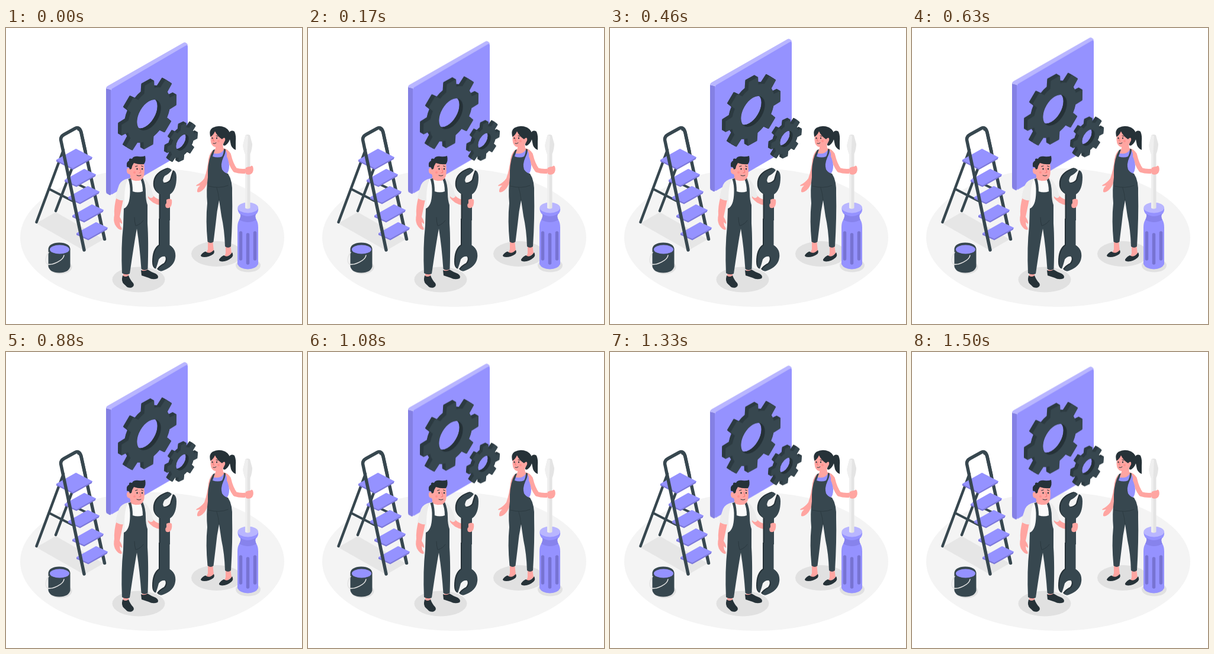
Recreate the animation shown at these times as an HTML page. Size 500 px wide and 500 px high, loop 1540 ms.

```html
<!DOCTYPE html>
<html lang="en">
<head>
<meta charset="utf-8">
<title>Maintenance crew</title>
<style>
  html, body { margin: 0; width: 100%; height: 100%; overflow: hidden; background: #fff; }
  svg { display: block; width: 100%; height: 100%; }
  .float { animation: float 770ms linear -55ms infinite alternate; }
  @keyframes float {
    from { transform: translateY(.7px); }
    to { transform: translateY(-9.3px); }
  }
  .floor { fill: #f4f4f4; }
  .shade { fill: #e1e1e1; }
  .dark { fill: #37474f; }
  .ink { fill: #263238; }
  .skin { fill: #ffa5a1; }
  .white { fill: #ececec; }
  .main { fill: #9592ff; }
  .light { fill: #b9b6ff; }
  .steel { fill: #e4e4e4; }
  .shine { fill: #efefef; }
  .line { fill: none; stroke-linecap: round; stroke-linejoin: round; }
  .rail { stroke: #37474f; stroke-width: 5.5; }
  .brace { stroke: #37474f; stroke-width: 4; }
  .arm { stroke: #ffa5a1; }
  .fine { stroke: #263238; stroke-width: 1; }
  .blush { fill: #ff8583; opacity: .6; }
  .gear path { stroke-width: 1.5; stroke-linejoin: round; }
</style>
</head>
<body>
<svg viewBox="0 0 500 500">
  <ellipse class="floor" cx="247" cy="354" rx="223" ry="117"/>
  <g class="shade">
    <ellipse cx="224" cy="425" rx="44.500" ry="21.500"/>
    <ellipse cx="356" cy="381.500" rx="43" ry="21.500"/>
    <ellipse cx="409" cy="401" rx="21" ry="11.500"/>
    <ellipse cx="92" cy="404" rx="19.500" ry="11.500"/>
    <path d="M51 330 L84 311 L165 357 L132 376 Z" opacity=".7"/>
  </g>

  <g class="float">
    <path d="M169 102 L177 104 V282 Q175 283 173 281 L171 280 Q169 279 169 276 Z" fill="#8480e4"/>
    <path class="light" d="M169 102 Q169 99.500 171.500 98 L299.500 25 Q302 23.700 304 25 Q307 26.500 307 29 L177 104 Z"/>
    <path class="main" d="M177 106 Q177 103.500 179 102.500 L304 29.500 Q307 28 307 31 V204 Q307 207 304 208.500 L180 280.500 Q177 282.500 177 279 Z"/>
    <g id="gears"></g>
  </g>

  <!-- ladder -->
  <g>
    <path class="line rail" d="M97 206 L51.500 328 M118 220 L84 309" style="stroke-width:4.500"/>
    <path class="line brace" d="M73 272 L112 292 M105 256 L142 274"/>
    <path class="line rail" d="M123 171 Q126 172 127 177 L166.500 356.500"/>
    <g id="steps"></g>
    <path class="line rail" d="M132 375 L93 191 Q91 184 98 180 L117 169.500 Q124 166 127 176 L134 208"/>
  </g>

  <!-- bucket -->
  <path class="dark" d="M71.500 373 Q73 363 90 362.500 Q107 363 108.500 373 V403 Q106 413 90 413.500 Q74 413 71.500 403 Z"/>
  <ellipse class="main" cx="90.500" cy="374" rx="16.500" ry="7.500"/>
  <path class="line" d="M72 379 C66 387 66 396 70 399 C78 401 97 393 98 384" stroke="#e4e4e4" stroke-width="1.600"/>

  <!-- man -->
  <g>
    <path class="line arm" d="M242 282 Q249 293 262 295" stroke-width="9"/>
    <path class="skin" d="M187 284 Q182 302 183 316 Q181 325 184 332 Q189 341 195 341 Q197 339 193 334 L192 328 L196 331 Q197 327 192 319 L198 290 Z"/>
    <path class="skin" d="M198 410 h9 v12 h-9 Z M230 400 h8 v12 h-8 Z"/>
    <path class="ink" d="M197 418 Q202 422 207 418 Q210 426 215 431 Q218 436 212 438.500 Q206 440 202 435 Q195 430 196 423 Z"/>
    <path class="ink" d="M228 409 Q234 412 239 408 Q245 412 253 415 Q259 419 256 423 Q248 426 241 422 L229 418 Z"/>
    <path class="white" d="M207 254 Q194 257 191 265 Q187 275 185 287 Q191 292 199 291 L199 306 H239 L240 284 Q244 290 249 285 Q246 270 240 261 Q236 254 229 253 Z"/>
    <path d="M207 255 Q199 262 200 304 L210 300 L215 277 H236 L229 254 Z" fill="#fafafa"/>
    <path class="skin" d="M210 246 H229 V254 Q220 262 210 255 Z"/>
    <path class="dark" d="M206.500 255 L211 254 Q214 263 214 276 Q223 279 231 276 Q231 263 227 255 L231 253.500 Q236 264 236 279 Q236 291 239 299 V330 Q241 360 239.500 407 Q234 411 228.500 407 Q226 370 221 339 Q217 360 209 415 Q202 418 196 414 Q194 370 198 334 L199 305 Q209 301 209.500 278 Q210 265 206.500 255 Z"/>
    <path class="line fine" d="M219 334 Q217 327 217 320 M220 334 Q228 331 232 325" opacity=".7"/>
    <path class="skin" d="M208 228 Q220 223 233 228 Q235 243 232.500 251 Q229 259 221 258 Q212 257 209 247 Q203 246 204 239 Q205 235 208 237 Z"/>
    <path class="ink" d="M204 234 Q203 226 208 224 Q207 219 213 221 Q215 216 224 217 Q230 218 235 216 Q237 225 233 230 Q224 231 216 228 Q213 232 212 238 L209 239 Q208 234 205 235 Z"/>
    <ellipse class="ink" cx="221.500" cy="238" rx="1.200" ry="1.600"/>
    <ellipse class="ink" cx="230" cy="238" rx="1.200" ry="1.600"/>
    <path class="line fine" d="M218.500 234 L222 233 M228.500 233 L231.500 234 M221 249 Q225 251 228 249"/>
    <path class="line" d="M226 237 L228 244 L225 244.500" stroke="#f2706e" stroke-width=".9"/>
    <circle class="blush" cx="217" cy="244" r="2"/>
  </g>

  <!-- wrench: one half, turned about its middle -->
  <defs>
    <path id="half" d="M260.500 325 V281 Q249 274 251 260 Q253 245 272 238 Q277 236 280 240 Q276 246 268 250 Q263 257 267 262 Q275 263 279 257 Q281 249 284 241 Q288 244 288 252 Q288 274 277 281 V325 Z"/>
    <g id="wrench">
      <use href="#half"/>
      <use href="#half" transform="rotate(180 268.500 324)"/>
    </g>
  </defs>
  <g class="ink"><use href="#wrench" x="-2" y="-1"/><use href="#wrench" x="-1" y="-.5"/></g>
  <use href="#wrench" class="dark"/>
  <path class="skin" d="M271 290 Q276 287 280 290 Q281 298 278 302 Q274 306 270 303 Q268 298 271 296 Z"/>

  <!-- woman -->
  <g>
    <path class="ink" d="M376 178 Q380 171 386 175 Q389 182 388 192 L388 206 Q380 203 379 193 Q378 185 374 183 Z"/>
    <path class="skin" d="M352 205 Q344 209 342 222 Q340 240 335 254 Q330 261 322 265 L321 267 L328 266 Q322 271 323 277 Q328 279 335 271 Q340 264 341 258 Q348 243 350 225 Z"/>
    <path class="skin" d="M341 357 h8 L351 377 L336 384 L341 374 Z M371 366 h8 L381 381 L366 391 L371 381 Z"/>
    <path class="ink" d="M329 384 Q332 379 337 377.500 Q344 383 351 375 Q353 379 350 382 Q343 387 335 387 Q329 387 329 384 Z"/>
    <path class="ink" d="M360 391 Q363 386 368 384 Q375 389 382 379 Q385 384 381 388 Q374 394 365 394.500 Q359 394 360 391 Z"/>
    <path class="line arm" d="M376 214 Q380 231 387 240 Q396 243 408 241.500" stroke-width="8"/>
    <path class="skin" d="M353 196 L366 194 L367 203 Q376 205 379 212 L380 223 L373 228 L348 220 L350 207 Q355 205 354 200 Z"/>
    <path class="main" d="M349 211 Q358 214 364 210 L368 206 Q374 207 373 217 Q376 223 377 232 Q377 242 373 246 H346 Z"/>
    <path class="dark" d="M350 206 L353 205 Q351 211 349 217 Q358 220 365 217 Q368 212 368 204 L371 205 Q371 211 367 219 Q362 230 365 239 Q369 245 375 246 Q383 258 382 280 Q383 320 380 369 Q375 373 370 369 Q369 340 364 318 L360 291 Q356 310 354.500 328 L350.500 361 Q346 365 340.500 361 Q337 325 340 296 Q338 273 341 252 Q340 230 346 214 Z"/>
    <path class="line fine" d="M360 291 Q359 279 356 270 M342 267 Q360 272 375 266" opacity=".6"/>
    <path class="skin" d="M346 175 Q357 168 368 180 L371 188 Q372 194 366 196 Q360 201 353 201 Q346 199 345.500 189 Z"/>
    <path class="ink" d="M345.500 184 Q342 173 349 168.500 Q359 163.500 370 168 Q379 173 379 183 Q378 193 371 198 Q368 200 366.500 197 L370 190 Q371 184 367 186 L365 188 Q357 183 353 174.500 Q351 180 345.500 184 Z"/>
    <ellipse class="ink" cx="348.500" cy="186" rx="1" ry="1.500"/>
    <ellipse class="ink" cx="356" cy="186" rx="1" ry="1.500"/>
    <path class="line fine" d="M355 182 L358 183 M350 195 Q353 196 355 194"/>
    <path class="line" d="M351 186 L349.500 190.500 L352 191" stroke="#f2706e" stroke-width=".9"/>
    <circle class="blush" cx="359" cy="191" r="2"/>
  </g>

  <!-- screwdriver -->
  <path class="main" d="M391.500 304 Q391 311 396 315 Q397 319 394 324 Q391 329 391 337 V399 Q395 407 408.500 407.500 Q422 407 426 399 V337 Q426 329 423 324 Q420 319 422 315 Q427 311 426 304 Z"/>
  <path d="M396 314 Q408 322 422 314 Q420 319 423 324 Q409 332 394 324 Q397 319 396 314 Z" fill="#8783ec"/>
  <ellipse class="light" cx="408.700" cy="303.500" rx="17.300" ry="9"/>
  <path class="steel" d="M404 304 V213 Q400 203 400.500 197 L404.500 181 Q408 179 412 181 L416 196 Q416 204 412.500 213 V304 Q408 307 404 304 Z"/>
  <path class="shine" d="M404 304 V213 Q400 203 400.500 197 L404.500 181 L409 182 L407.500 212 V305 Z"/>
  <path class="skin" d="M405 236 Q409 234 413 234 Q415 231 417 234 Q419 240 416 245 Q412 249 406 247 Q402 243 405 236 Z"/>
  <path class="line" d="M396.500 346 V390 M408.500 349 V397 M420.500 346 V390" stroke="#7773d2" stroke-width="5.500"/>
</svg>
<script>
  const $ = id => document.getElementById(id);

  function gearPath(r, root, hole, teeth, turn) {
    const at = (rad, deg) => {
      const a = deg * Math.PI / 180;
      return (rad * Math.cos(a)).toFixed(2) + ' ' + (rad * Math.sin(a)).toFixed(2);
    };
    let d = '';
    for (let i = 0; i < teeth; i++) {
      const a = turn + i * 360 / teeth;
      d += `${i ? 'L' : 'M'}${at(root, a - 13)}L${at(r, a - 9)}L${at(r, a + 9)}L${at(root, a + 13)}`;
      d += `A${root} ${root} 0 0 1 ${at(root, a + 360 / teeth - 13)}`;
    }
    return d + `ZM${hole} 0A${hole} ${hole} 0 1 0 ${-hole} 0A${hole} ${hole} 0 1 0 ${hole} 0Z`;
  }

  // Stacked copies give the gear its thickness, back to front.
  function gear(x, y, depth, r, root, hole, turn) {
    const d = gearPath(r, root, hole, 8, turn);
    const at = k => `transform="matrix(.866 -.5 0 1 ${x - k} ${y - k * .577})"`;
    const face = (k, color) => `<path ${at(k)} d="${d}" fill="${color}" stroke="${color}" fill-rule="evenodd"/>`;
    let rim = '', wall = '';
    for (let k = depth; k > 0; k -= .5) {
      rim += face(k, '#2d3b42');
      wall += `<circle ${at(k)} r="${hole + 1}" fill="none" stroke="#263238" stroke-width="3"/>`;
    }
    return `<g class="gear">${rim}${wall}${face(0, '#37474f')}</g>`;
  }

  $('gears').innerHTML =
    gear(241.5, 147, 6, 53.5, 41, 24, 1) +
    gear(298, 193.5, 5, 29.5, 22, 13, 5);

  function step(x, y, w, h) {
    const right = `${x + w + 32} ${y + h - 18}`, low = `${x + w} ${y + h}`;
    return `<path d="M${x} ${y}L${x + 32} ${y - 18}L${right}L${low}Z" fill="#9592ff" stroke="#9592ff" stroke-width="2" stroke-linejoin="round"/>` +
      `<path d="M${x - 1} ${y}L${low}L${right}v2.5L${x + w} ${y + h + 2.5}L${x - 1} ${y + 2.5}Z" fill="#7d79da"/>`;
  }

  $('steps').innerHTML = step(86, 223, 27, 14) +
    [[100, 257], [106, 286], [113, 317], [120, 347]].map(([x, y]) => step(x, y, 19, 9)).join('');
</script>
</body>
</html>
```
